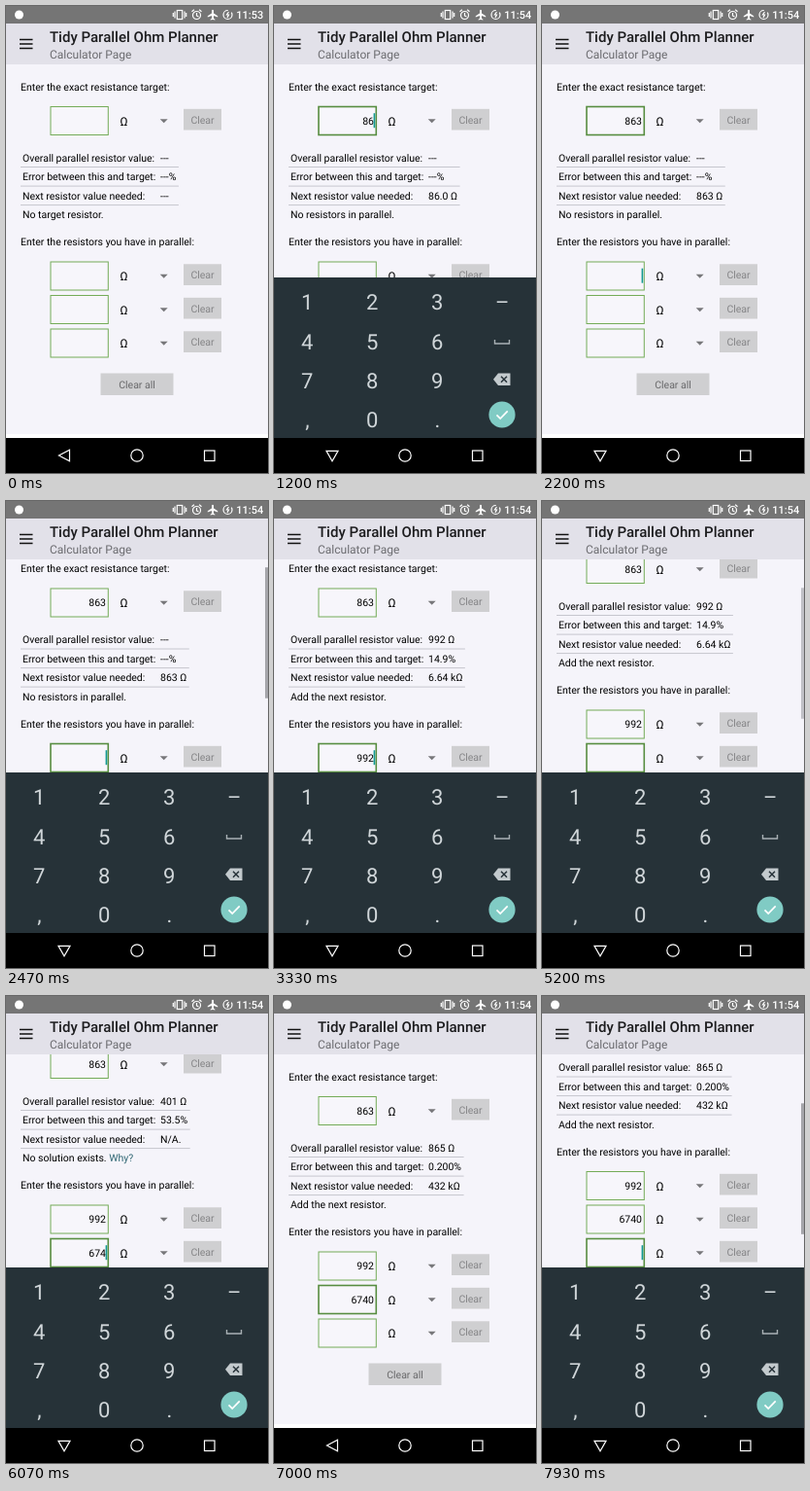
Recreate the animation shown at these times as an HTML page. Size 270 px wide and 480 px high, loop 8 s.

```html
<!DOCTYPE html>
<html lang="en">
<head>
<meta charset="utf-8">
<title>Resistor calculator</title>
<style>
html, body { margin: 0; width: 100%; height: 100%; overflow: hidden; background: #f5f4fa; }
svg { display: block; width: 270px; height: 480px; font: 10.5px Roboto, sans-serif; text-rendering: geometricPrecision; }
.line { stroke: #c6c6ce; }
.box { fill: #f7f6fb; stroke: #74ac58; }
.box.on { stroke: #578d40; stroke-width: 1.6; }
.btn { fill: #cfcfd1; }
.mid { text-anchor: middle; }
.end { text-anchor: end; }
.key { font-size: 22px; fill: #d0d6d9; text-anchor: middle; }
.icon { fill: none; stroke: #fff; stroke-width: 1.2; }
</style>
</head>
<body>
<svg id="stage" viewBox="0 0 270 480"></svg>
<script>
const LOOP = 8000, STEP = 1000 / 15;
const tops = [103.5, 263, 297.5, 332];
const rows = [159.7, 179.3, 198.8, 218.3];
const labels = ['Overall parallel resistor value:', 'Error between this and target:', 'Next resistor value needed:'];
const keyRows = ['123–', '456 ', '789 ', ',0. '];

// [time, field, character]
const typed = [
  [870, 0, '8'], [1130, 0, '6'], [1330, 0, '3'],
  [2800, 1, '9'], [3000, 1, '9'], [3270, 1, '2'],
  [5470, 2, '6'], [5800, 2, '7'], [6000, 2, '4'], [6400, 2, '0']
];
const pressed = [[870, 1, 2], [2800, 2, 2], [5470, 2, 1]]; // [time, column, row]
const focus = [[330, 0], [2270, 1], [4330, 2], [7470, 3]];
const carets = [[400, 0], [2200, 1], [4430, 2], [7470, 3], ...typed].sort((a, b) => a[0] - b[0]);
const panel = [[330, 1], [1670, 0], [2200, 1], [3730, 0], [4330, 1], [6870, 0], [7470, 1]];
const scrolls = [[0, 1, 0], [2330, 140, 13.5], [3730, 1, 0], [4470, 200, 48], [6870, 1, 0], [7600, 330, 82.5]];
const bars = [[2330, 2930], [4470, 5200], [7600, 9000]]; // [shown, fading]

const clamp = x => Math.max(0, Math.min(1, x));
const last = (list, t) => list.filter(e => e[0] <= t).pop();
const text = (x, y, s, attr = '') => `<text x="${x}" y="${y}" ${attr}>${s}</text>`;
const rect = (x, y, w, h, attr) => `<rect x="${x}" y="${y}" width="${w}" height="${h}" ${attr}/>`;
const path = (d, attr) => `<path d="${d}" ${attr}/>`;

const field = (y, i) =>
  rect(46, y, 59.3, 29, 'class="box"') +
  text(103, y + 18.2, '', `class="end" id="in${i}"`) +
  text(117.5, y + 19, 'Ω', 'font-size="12"') +
  path(`M158.7 ${y + 12.7}h8l-4 4z`, 'fill="#77777a"') +
  rect(183, y + 2.3, 39, 21.7, 'class="btn"') +
  text(202.5, y + 17, 'Clear', 'class="mid" fill="#858587"');

const page = `<g id="page">
  ${text(15, 86.6, 'Enter the exact resistance target:')}
  ${labels.map((s, i) => text(17, rows[i], s) + text(159, rows[i], '', `id="val${i}"`) +
    path('', `class="line" id="rule${i}"`)).join('')}
  ${text(17, rows[3], '', 'id="note"')}
  ${text(15, 246.2, 'Enter the resistors you have in parallel:')}
  ${tops.map(field).join('')}
  ${rect(97.5, 377.5, 75, 22.5, 'class="btn"')}
  ${text(135, 392.6, 'Clear all', 'class="mid" fill="#68686a"')}
  ${rect(102.6, 0, 1.6, 15, 'fill="#129a92" id="caret"')}
</g>`;

const header = rect(0, 18, 270, 42, 'fill="#e2e1e9"') +
  path('M14 34.5h13.5M14 39h13.5M14 43.5h13.5', 'stroke="#111" stroke-width="1.6"') +
  text(45, 37.3, 'Tidy Parallel Ohm Planner', 'font-size="15" font-weight="500" fill="#1c1c1e"') +
  text(45, 53.8, 'Calculator Page', 'font-size="12" fill="#6c6c70"');

const status = rect(0, 0, 270, 18, 'fill="#757575"') +
  '<circle cx="13.5" cy="9" r="4.5" fill="#fff"/>' +
  `<g class="icon">
    ${rect(176.3, 4.5, 5.4, 9, '')}
    <path d="M174 5.5v7M184 5.5v7M172.3 7v4M185.7 7v4"/>
    <circle cx="196.5" cy="9.5" r="4"/>
    <path d="M196.5 7v3l2 1M191.5 5.8l2.4-2M201.5 5.8l-2.4-2"/>
    <circle cx="228.5" cy="9" r="4.5" stroke-dasharray="21 4"/>
    <path d="M229.5 6l-2 3h2l-1.5 3"/>
  </g>` +
  path('M212 4.5q1-1.5 2 0v3l4.2 2.7v1.2l-4.2-1.3v2.6l1.4 1v.9l-2.4-.7-2.4.7v-.9l1.4-1v-2.6l-4.2 1.3v-1.2l4.2-2.7z', 'fill="#fff"') +
  text(265.3, 13, '', 'class="end" font-size="11" font-weight="500" fill="#fff" id="clock"');

const keyX = c => 34.3 + c * 67;
const keyY = r => 304.5 + r * 40.3;
const keyboard = `<g id="board">
  ${rect(0, 279, 270, 165, 'fill="#263238"')}
  ${rect(0, 0, 67, 40, 'fill="#3b474e" id="press"')}
  ${keyRows.map((s, r) => [...s].map((k, c) => k === ' ' ? '' : text(keyX(c), keyY(r) + 7.7, k, 'class="key"')).join('')).join('')}
  ${path('M227.5 343v4h15v-4', 'fill="none" stroke="#a9b1b5" stroke-width="1.4"')}
  ${path('M231 377.5h12.5v12.5h-12.5l-5-6.25z', 'fill="#c3cacd"')}
  ${path('M234 380.7l6 6m0-6l-6 6', 'stroke="#263238" stroke-width="1.5"')}
  <circle cx="235" cy="420" r="13.6" id="done"/>
  ${path('M229.5 420.3l3.7 3.7 7.5-7.7', 'fill="none" stroke="#fff" stroke-width="1.7"')}
</g>`;

const nav = rect(0, 444, 270, 36, 'fill="#000"') +
  `<g class="icon" stroke-width="1.4"><path id="back"/><circle cx="135" cy="462" r="6.2"/>${rect(204.5, 457, 10.5, 10.5, '')}</g>`;

document.getElementById('stage').innerHTML =
  rect(0, 0, 270, 480, 'fill="#f5f4fa"') + page + rect(0, 440, 270, 4, 'fill="#fff"') +
  rect(267, 60, 3, 134.5, 'fill="#a6a6ab" id="bar"') + header + status + keyboard + nav;

const $ = id => document.getElementById(id);
const boxes = document.querySelectorAll('.box');
const set = (id, attrs) => { for (const k in attrs) $(id).setAttribute(k, attrs[k]); };
const content = (t, i) => typed.filter(e => e[1] === i && e[0] <= t).map(e => e[2]).join('');
const ohms = v => v < 999.5 ? v.toPrecision(3) + ' Ω' : (v / 1000).toPrecision(3) + ' kΩ';

function results(target, parts) {
  if (!target) return ['---', '---%', '---', 'No target resistor.'];
  if (!parts.length) return ['---', '---%', ohms(target), 'No resistors in parallel.'];
  const total = 1 / parts.reduce((sum, r) => sum + 1 / r, 0);
  const error = Math.abs(total - target) / target * 100;
  const done = [ohms(total), error.toPrecision(3) + '%'];
  return total < target
    ? [...done, 'N/A.', 'No solution exists. <tspan fill="#2f6673">Why?</tspan>']
    : [...done, ohms(1 / (1 / target - 1 / total)), 'Add the next resistor.'];
}

let shown = '';
function showResults(t) {
  const nums = tops.map((_, i) => +content(t, i));
  const res = results(nums[0], nums.slice(1).filter(Boolean));
  if (shown === res.join()) return;
  shown = res.join();
  labels.forEach((_, i) => $('val' + i).textContent = res[i]);
  $('note').innerHTML = res[3];
  const right = 161.5 + Math.max(...labels.map((_, i) => $('val' + i).getComputedTextLength()));
  labels.forEach((_, i) => set('rule' + i, { d: `M15 ${rows[i] + 5.8}H${right}` }));
}

function draw(t) {
  tops.forEach((_, i) => $('in' + i).textContent = content(t, i));
  showResults(t - 60);
  $('clock').textContent = t < 330 ? '11:53' : '11:54';

  const active = last(focus, t);
  boxes.forEach((b, i) => b.classList.toggle('on', !!active && active[1] === i));
  const caret = last(carets, t);
  const lit = caret && t - caret[0] < 500;
  set('caret', { y: tops[caret ? caret[1] : 0] + 6.7, opacity: lit ? 1 : 0 });

  const k = scrolls.findLastIndex(s => s[0] <= t);
  const [start, time, to] = scrolls[k];
  const p = clamp((t - start) / time);
  const y = to * (to ? 1 - (1 - p) ** 2 : 1);
  set('page', { transform: `translate(0 ${-y})` });
  const bar = last(bars, t);
  const hidden = !bar || t > bar[1] + 300;
  set('bar', { y: 60 + y * .61, opacity: hidden ? 0 : 1 - clamp((t - bar[1] + 67) / 200) });

  const [at, open] = last(panel, t) || [-999, 0];
  const up = open ? clamp((t - at - 4) / 128) : 1 - clamp((t - at + 67) / 200);
  set('board', { opacity: up, transform: `translate(0 ${(1 - up) * 25})` });
  set('back', { d: open ? 'M54 457.3h12l-6 10.4z' : 'M65.5 456.3v11.4l-11-5.7z' });
  const hit = pressed.find(e => t >= e[0] && t < e[0] + 60);
  set('press', hit ? { x: keyX(hit[1]) - 33.5, y: keyY(hit[2]) - 20.3, opacity: 1 } : { opacity: 0 });
  set('done', { fill: t >= 1470 && t < 1930 ? '#6bb3ac' : '#80cbc4' });
}

function tick() {
  const t = performance.now() % LOOP;
  draw(Math.floor((t + 4) / STEP) * STEP + 4);
  requestAnimationFrame(tick);
}
tick();
</script>
</body>
</html>
```
